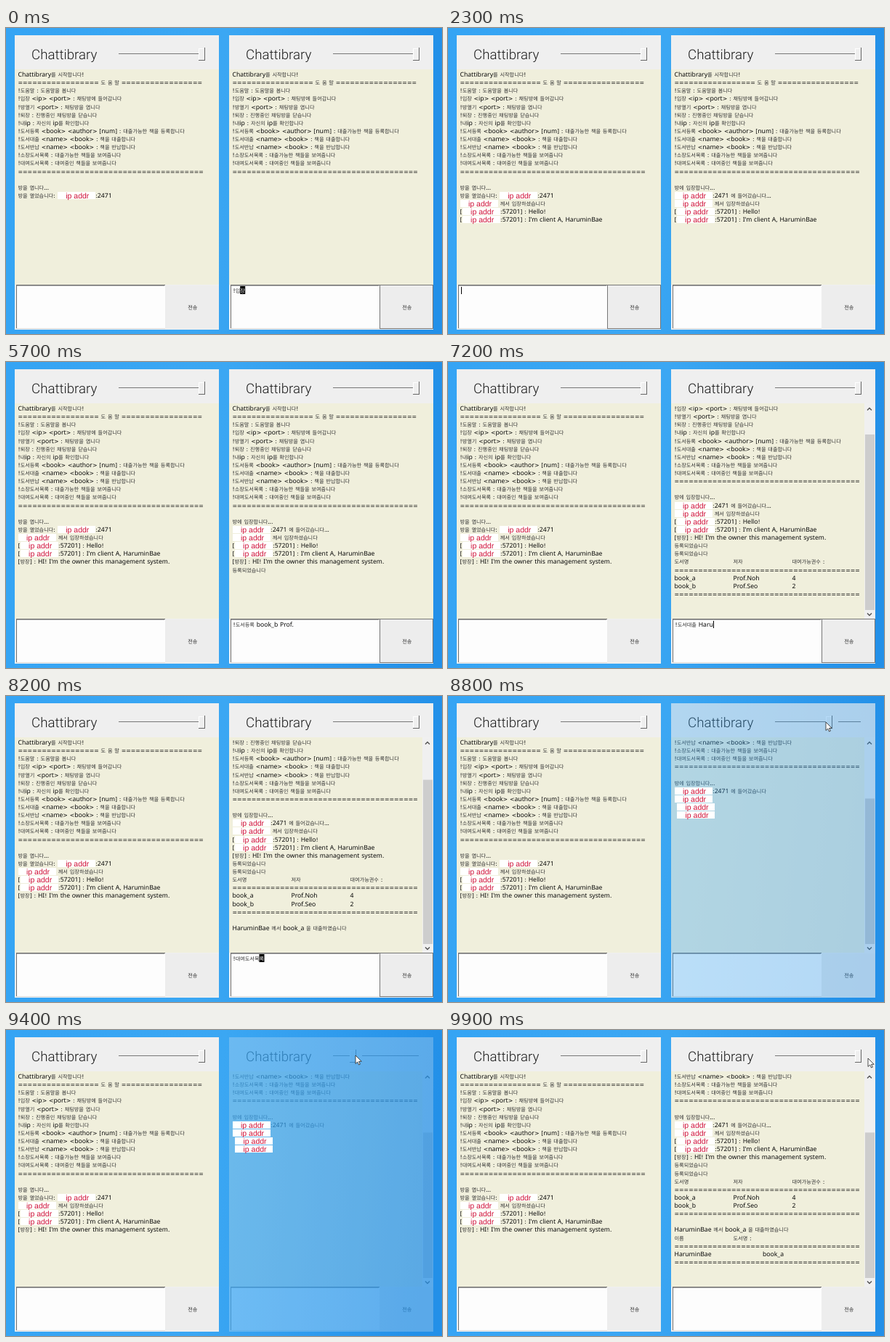
An HTML page with a canvas that plays this animation: 600 px wide and 422 px high, repeating every 10000 ms.

```html
<!DOCTYPE html>
<html lang="ko">
<head>
<meta charset="utf-8">
<title>Chattibrary</title>
<style>
html, body { margin: 0; width: 100%; height: 100%; overflow: hidden; background: #37a4f2; }
canvas { display: block; }
</style>
</head>
<body>
<canvas id="stage" width="600" height="422"></canvas>
<script>
const LOOP = 10000, STEP = 100;
const W = 281, H = 406, TOP = 10, ROW = 11.13, TAB = 40.5, TEXT_X = 4.5;
const FONTS = {
  latin: '8.65px "Noto Sans", sans-serif',
  symbol: '7.82px "DejaVu Sans", sans-serif',
  hangul: '7.15px "Noto Sans CJK KR", "Noto Sans CJK", sans-serif',
  title: '300 18.7px Roboto, sans-serif',
  ip: '10.5px "Liberation Sans", Arial, sans-serif'
};
const RUNS = /[가-힣]+|[=<>!:\[\]]+|@|\t| |[^가-힣=<>!:\[\]@\t ]+/g;
const isHangul = s => /^[가-힣]/.test(s);

const ctx = document.getElementById('stage').getContext('2d');
const pane = document.createElement('canvas');
pane.width = W;
pane.height = H;
const g = pane.getContext('2d');
for (const c of [ctx, g]) c.textRendering = 'geometricPrecision';

const RULE = '='.repeat(39);
const HALF = '='.repeat(17);
const HELP = [
  'Chattibrary를 시작합니다!',
  HALF + ' 도 움 말 ' + HALF,
  '!도움말 : 도움말을 봅니다',
  '!입장 <ip> <port> : 채팅방에 들어갑니다',
  '!방열기 <port> : 채팅방을 엽니다',
  '!퇴장 : 진행중인 채팅방을 닫습니다',
  '!내ip : 자신의 ip를 확인합니다',
  '!도서등록 <book> <author> [num] : 대출가능한 책을 등록합니다',
  '!도서대출 <name> <book> : 책을 대출합니다',
  '!도서반납 <name> <book> : 책을 반납합니다',
  '!소장도서목록 : 대출가능한 책들을 보여줍니다',
  '!대여도서목록 : 대여중인 책들을 보여줍니다',
  RULE, ''
];
const READER = 'HaruminBae';
const INTRO = "I'm client A, " + READER;
const HOST = "HI! I'm the owner this management system.";
const DONE = '등록되었습니다';

// Typed messages: side (0 left, 1 right), text, start, ms per character, send time
const TYPED = [
  [1, '!입장 @ 2471', -300, 100, 800],
  [1, 'Hello!', 900, 60, 1300],
  [1, INTRO, 1400, 30, 2200],
  [0, HOST, 2500, 35, 4000],
  [1, '!도서등록 book_a Prof.Noh 4', 4200, 30, 5000],
  [1, '!도서등록 book_b Prof.Seo 2', 5160, 30, 6000],
  [1, '!소장도서목록', 6100, 60, 6600],
  [1, `!도서대출 ${READER} book_a`, 6800, 40, 7800],
  [1, '!대여도서목록', 7900, 40, 8300]
];

// Replies: time, lines for the left side, lines for the right side
const both = (t, line) => [t, [line], [line]];
const REPLIES = [
  [0, ['방을 엽니다...', '방을 열었습니다: @:2471'], []],
  [800, ['@ 께서 입장하셨습니다'],
    ['방에 입장합니다...', '@:2471 에 들어갔습니다...', '@ 께서 입장하셨습니다']],
  both(1300, '[@:57201] : Hello!'),
  both(2200, '[@:57201] : ' + INTRO),
  both(4000, '[방장] : ' + HOST),
  [5000, [], [DONE]],
  [6000, [], [DONE]],
  [6600, [], ['도서명\t\t저자\t\t대여가능권수 :', RULE,
    'book_a\t\tProf.Noh\t\t4', 'book_b\t\tProf.Seo\t\t2', RULE]],
  [7800, [], ['', READER + ' 께서 book_a 을 대출하였습니다']],
  [8300, [], ['이름\t\t도서명 :', RULE, READER + '\t\tbook_a', RULE]]
];

// Key points: time, value(s)
const KNOB = [[8500, 262], [8800, 222], [9400, 175], [9800, 262]];
const POINTER = [[8400, 566, 50], [8500, 562, 37], [8800, 520, 36],
  [9400, 481, 35], [9800, 564, 36], [9900, 578, 39]];

function along(keys, t, k = 1) {
  if (t <= keys[0][0]) return keys[0][k];
  for (let i = 1; i < keys.length; i++) {
    const a = keys[i - 1], b = keys[i];
    if (t <= b[0]) return a[k] + (b[k] - a[k]) * (t - a[0]) / (b[0] - a[0]);
  }
  return keys[keys.length - 1][k];
}

function rect(c, color, x, y, w, h) {
  c.fillStyle = color;
  c.fillRect(x, y, w, h);
}

// Draws mixed text around the centre line y and returns its right end
function write(str, x0, y, boxes, color) {
  const base = Math.round(y + 3);
  let x = x0;
  for (const run of str.match(RUNS) || []) {
    if (run === ' ') x += 2.8;
    else if (run === '\t') x = x0 + (Math.floor((x - x0) / TAB) + 1) * TAB;
    else if (run === '@') {
      boxes.push([x, y]);
      x += 52.5;
    } else {
      const hangul = isHangul(run);
      g.font = hangul ? FONTS.hangul : /^[=<>!:\[\]]/.test(run) ? FONTS.symbol : FONTS.latin;
      g.fillStyle = color || (hangul ? '#303030' : '#080808');
      g.fillText(run, x, base);
      x += g.measureText(run).width;
    }
  }
  return x;
}

function header(knob) {
  rect(g, '#efefef', 0, 0, W, 47);
  g.font = FONTS.title;
  g.fillStyle = '#1c1c1c';
  g.fillText('Chattibrary', 23, 33);
  rect(g, '#777', 143, 25, knob - 152, 1);
  if (knob < 253) rect(g, '#777', knob + 8, 25, 253 - knob, 1);
  rect(g, '#fff', knob - 9, 18, 9, 1);
  rect(g, '#fff', knob - 9, 18, 1, 17);
  rect(g, '#666', knob - 1, 17, 1, 18);
  rect(g, '#666', knob - 9, 34, 9, 1);
}

function arrow(y, dir) {
  g.strokeStyle = '#505050';
  g.lineWidth = 1.4;
  g.beginPath();
  g.moveTo(270, y + 1.5 * dir);
  g.lineTo(273, y - 1.5 * dir);
  g.lineTo(276, y + 1.5 * dir);
  g.stroke();
}

function scrollbar(first, count) {
  const y = 62 + 270 * first / (count + 2);
  rect(g, '#f0f0f0', 266, 47, 15, 297);
  rect(g, '#cdcdcd', 267, y, 13, 332 - y);
  arrow(55, 1);
  arrow(338, -1);
}

function log(lines, faded, boxes) {
  rect(g, '#f0efdc', 0, 47, W, 298);
  const first = Math.max(0, lines.length - 24);
  g.save();
  g.beginPath();
  g.rect(0, first ? 51 : 47, W, 293);
  g.clip();
  lines.slice(first).forEach((line, i) => {
    const hidden = faded && i > 6;
    if (!hidden) write(faded ? line.replace('...', i > 5 ? '' : '...') : line, TEXT_X, 54 + ROW * i, boxes);
    else if (line.includes('@')) boxes.push([TEXT_X + (line[0] === '[' ? 3.5 : 0), 54 + ROW * i]);
  });
  g.restore();
  if (first) scrollbar(first, lines.length);
}

function entry(side, t, focused, boxes) {
  rect(g, '#f0f0f0', 0, 344, W, 62);
  rect(g, '#fdfdfd', 2, 345, 205, 59);
  rect(g, '#707070', 2, 344, 205, 1);
  rect(g, '#707070', 2, 344, 1, 60);
  rect(g, '#a8a8a8', 3, 345, 203, 1);
  rect(g, '#dcdcdc', 2, 404, 205, 1);
  rect(g, '#ededed', 207, 345, 74, 60);
  if (focused) {
    rect(g, '#777', 207, 344, 74, 1);
    rect(g, '#777', 207, 344, 1, 61);
    rect(g, '#777', 280, 344, 1, 61);
    rect(g, '#777', 207, 404, 74, 1);
  }
  write('전송', 238.3, 375, boxes);

  const now = TYPED.find(m => m[0] === side && t >= m[2] && t < m[4]);
  let text = '', busy = false;
  if (now) {
    const n = Math.floor((t - now[2]) / now[3]);
    text = now[1].slice(0, n);
    busy = n <= now[1].length;
  }
  const last = text.slice(-1);
  if (busy && isHangul(last)) {
    const x = write(text.slice(0, -1), 5.5, 352, boxes);
    rect(g, '#000', x, 346, 7, 11);
    write(last, x, 352, boxes, '#fff');
  } else {
    const x = write(text, 5.5, 352, boxes);
    if (focused && t % 1000 < 500) rect(g, '#000', Math.round(x), 347, 1, 10);
  }
}

function chat(side, t) {
  const x = side ? 307 : 12, boxes = [];
  const knob = side ? Math.round(along(KNOB, t)) : 262;
  const alpha = (knob - 143) / 119;
  const focus = t < 2300 ? 1 : t < 4100 ? 0 : t < 8400 ? 1 : -1;
  const lines = HELP.concat(...REPLIES.filter(r => t >= r[0]).map(r => r[1 + side]));

  header(knob);
  log(lines, alpha < 0.9, boxes);
  entry(side, t, focus === side, boxes);
  ctx.globalAlpha = alpha;
  ctx.drawImage(pane, x, TOP);
  ctx.globalAlpha = 1;

  for (const [bx, by] of boxes) {
    const y = Math.round(by + TOP);
    rect(ctx, '#fff', Math.round(x + bx), y - 5, 52, 10);
    ctx.font = FONTS.ip;
    ctx.fillStyle = '#cf1238';
    ctx.fillText('ip addr', x + bx + 11.5, y + 4);
  }
}

function pointer(x, y) {
  const pts = [[0, 0], [0, 11.5], [2.7, 9], [4.5, 13], [6.3, 12.2], [4.6, 8.3], [8.2, 8.3]];
  ctx.beginPath();
  for (const [px, py] of pts) ctx.lineTo(x + px, y + py);
  ctx.closePath();
  ctx.fillStyle = '#fff';
  ctx.fill();
  ctx.strokeStyle = '#222';
  ctx.lineWidth = 0.8;
  ctx.stroke();
}

function desktop() {
  const sky = ctx.createLinearGradient(0, 0, 600, 60);
  sky.addColorStop(0, '#35a4f4');
  sky.addColorStop(0.5, '#3ba7f3');
  sky.addColorStop(1, '#2390e8');
  rect(ctx, sky, 0, 0, 600, 422);
}

function draw(ms) {
  const t = Math.floor(ms % LOOP / STEP) * STEP;
  desktop();
  chat(0, t);
  chat(1, t);
  if (t >= 8400) pointer(along(POINTER, t, 1), along(POINTER, t, 2));
}

const start = performance.now();
function tick() {
  draw(performance.now() - start);
  requestAnimationFrame(tick);
}
tick();
</script>
</body>
</html>
```
